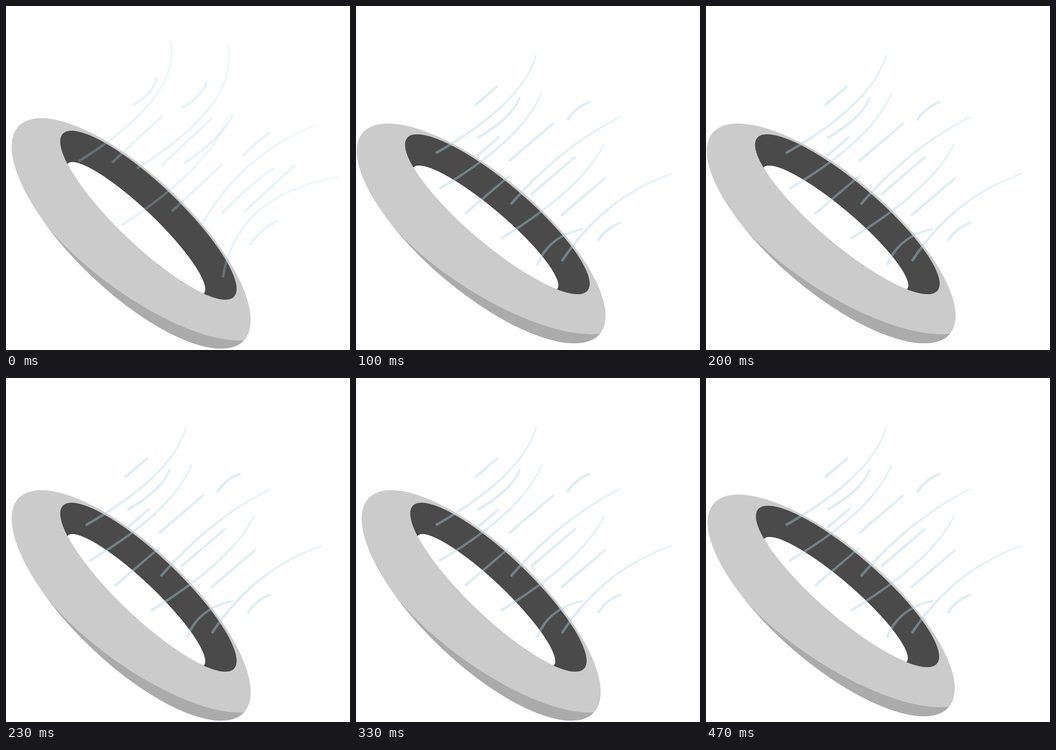
An HTML page with a canvas that plays this animation: 720 by 720 pixels, repeating every 0.54 s.

```html
<!DOCTYPE html>
<html lang="en">
<head>
<meta charset="utf-8">
<title>Wobbling ring in the wind</title>
<style>
html, body { margin: 0; height: 100%; overflow: hidden; background: #fff; }
canvas { display: block; }
</style>
</head>
<body>
<canvas id="stage" width="720" height="720"></canvas>
<script>
const ctx = document.getElementById('stage').getContext('2d');
const LOOP = 540;
const gustChanges = [70, 130, 200, 260, 330, 400, 470];
const tilts = [[0, 0], [100, -3.3], [230, 0], [400, -2.75]];
const rad = deg => deg * Math.PI / 180;

// A gust has one wind angle and streaks [x, y, bend] grouped by length.
const gusts = [
  {
    angle: 43, alpha: 0.28,
    groups: [
      [320, [[152, 325, 0.29], [274, 340, 0.3], [242, 459, 0.15], [409, 459, -0.18], [454, 568, -0.35]]],
      [145, [[222, 328, 0], [325, 334, 0], [372, 330, 0.13], [347, 430, 0], [452, 434, -0.05], [499, 431, 0]]],
      [77, [[265, 208, 0.25], [369, 213, 0.22], [496, 314, -0.06], [510, 501, -0.15]]]
    ]
  },
  {
    angle: 40.5, alpha: 0.4,
    groups: [
      [294, [[167, 308, 0.18], [174, 383, 0.15], [324, 415, -0.1], [303, 487, 0.13], [431, 534, -0.17]]],
      [123, [[254, 276, 0.17], [228, 435, 0], [320, 325, 0], [366, 395, 0], [429, 439, 0], [379, 543, -0.27]]],
      [62, [[249, 208, 0], [253, 314, 0], [442, 239, -0.17], [506, 492, -0.18]]]
    ]
  }
];

function ellipse(x, y, a, b, color) {
  ctx.beginPath();
  ctx.ellipse(x, y, a, b, rad(43.6), 0, 2 * Math.PI);
  ctx.fillStyle = color;
  ctx.fill();
}

function drawRing(tilt) {
  ctx.save();
  ctx.translate(262, 476);
  ctx.rotate(rad(tilt));
  ctx.translate(-262, -476);

  ctx.save();
  ellipse(262, 476, 325.4, 122, '#cbcbcb');
  ctx.clip();
  ctx.beginPath();
  ctx.moveTo(45, 400);
  ctx.bezierCurveTo(121, 543, 368, 707, 498, 700);
  ctx.lineTo(530, 700);
  ctx.lineTo(530, 740);
  ctx.lineTo(0, 740);
  ctx.lineTo(0, 400);
  ctx.fillStyle = '#ababab';
  ctx.fill();
  ctx.restore();

  ellipse(298.1, 437.9, 247.3, 64.8, '#4a4a4a');
  ctx.clip();
  ellipse(271.3, 466, 197, 43, '#fff');
  ctx.restore();
}

// Bent streaks swing away from the wind; long ones end thinner.
function drawStreak(x, y, length, bend, angle) {
  const swing = bend < 0 ? -2 : 120 * bend * bend;
  const dx = length * Math.cos(rad(angle + swing));
  const dy = -length * Math.sin(rad(angle + swing));
  const reach = 0.6 + bend / 2;
  const cx = dx * reach - dy * bend;
  const cy = dy * reach + dx * bend;
  const steps = 32, left = [], right = [];
  for (let i = 0; i <= steps; i++) {
    const t = i / steps, p = 2 * t * (1 - t), q = t * t;
    const px = x + p * cx + q * dx;
    const py = y + p * cy + q * dy;
    const tx = (1 - 2 * t) * cx + t * dx;
    const ty = (1 - 2 * t) * cy + t * dy;
    const k = (5.5 - t * length / 90) / 2 / Math.hypot(tx, ty);
    left.push([px - ty * k, py + tx * k]);
    right.unshift([px + ty * k, py - tx * k]);
  }
  ctx.beginPath();
  for (const point of left.concat(right)) ctx.lineTo(...point);
  ctx.fill();
}

function drawGust({ angle, alpha, groups }) {
  ctx.fillStyle = `rgba(172, 210, 225, ${alpha})`;
  for (const [length, streaks] of groups) {
    for (const [x, y, bend] of streaks) drawStreak(x, y, length, bend, angle);
  }
}

let start;
function render(now) {
  start ??= now;
  const time = (now - start) % LOOP;
  const [, tilt] = tilts.findLast(([from]) => from <= time);
  const changes = gustChanges.filter(at => at <= time).length;
  ctx.fillStyle = '#fff';
  ctx.fillRect(0, 0, 720, 720);
  drawRing(tilt);
  drawGust(gusts[changes % 2]);
  requestAnimationFrame(render);
}
requestAnimationFrame(render);
</script>
</body>
</html>
```
